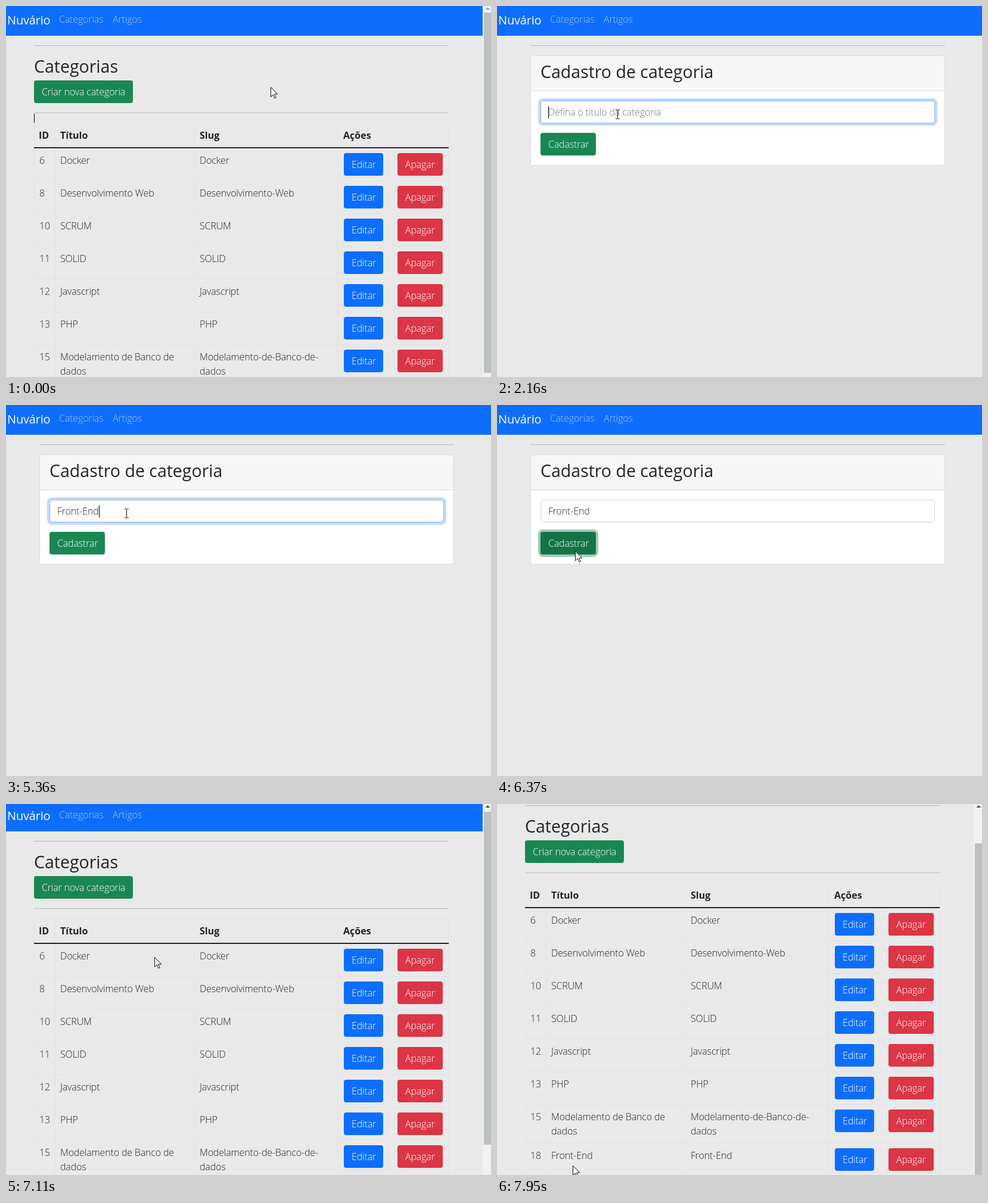
An HTML page for the animation above (8000 ms loop, 814x623 px).

```html
<!DOCTYPE html>
<html lang="pt-BR">
<head>
<meta charset="utf-8">
<title>Categorias</title>
<style>
html, body { margin: 0; width: 100%; height: 100%; overflow: hidden; background: #e9e9e9; }
svg { display: block; width: 814px; height: 623px; }
text { font: 300 16px "Open Sans", "Noto Sans", sans-serif; letter-spacing: -.01em; fill: #212529; white-space: pre; }
.bold { font-weight: 700; letter-spacing: 0; }
.head { font-size: 28.5px; font-weight: 400; letter-spacing: 0; }
.brand { font-size: 20px; font-weight: 400; fill: #fff; }
.nav { fill: #fff; fill-opacity: .6; }
.white { fill: #fff; }
.hint { fill: #6c757d; }
</style>
</head>
<body>
<svg viewBox="0 0 814 623">
  <rect width="814" height="623" fill="#e9e9e9"/>
  <g id="list"></g>
  <g id="bar">
    <rect x="800" width="14" height="623" fill="#f1f1f1"/>
    <path id="up" d="M804.5 6l4-4 4 4z"/>
    <rect id="thumb" x="802" width="12" fill="#bdc0c0"/>
  </g>
  <g id="form"></g>
  <path id="status" d="M0 620.5H198.500Q201.500 620.500 202 623H0z" fill="#dee1e6" stroke="#c6c6c6"/>
  <path id="arrow" d="M.5.5v16l3.700-3.600 2.600 6 2.300-1-2.600-5.900h5.200z" fill="#fff" stroke="#111"/>
  <path id="beam" d="M-3.500-7.500h3M.5-7.500h3M0-7V7M-3.500 7.500h3M.5 7.500h3" fill="none" stroke="#111"/>
</svg>
<script>
const LOOP = 8000, INK = '#212529', GREEN = '#198754', BLUE = '#0d6efd', RED = '#dc3545';
const $ = id => document.getElementById(id);
const rect = (x, y, w, h, fill, more = '') =>
  `<rect x="${x}" y="${y}" width="${w}" height="${h}" fill="${fill}" ${more}/>`;
const text = (x, y, s, cls = '', id = '') => `<text x="${x}" y="${y}" class="${cls}" id="${id}">${s}</text>`;
const button = (x, y, w, label, fill) =>
  rect(x, y, w, 38, fill, 'rx="4"') + text(x + 13, y + 25, label, 'white');

// Green button with a hover layer and a focus ring
const action = (id, x, y, w, label) =>
  rect(x - 2, y - 2, w + 4, 42, 'none', `id="${id}Ring" rx="6" stroke="#3c996e" stroke-opacity=".5" stroke-width="4"`) +
  rect(x, y, w, 38, GREEN, 'rx="4"') +
  rect(x, y, w, 38, '#157347', `id="${id}Hover" rx="4"`) +
  text(x + 13, y + 25, label, 'white');

const header = w => rect(0, 0, w, 50, BLUE) + text(2, 31, 'Nuvário', 'brand') +
  text(89, 28, 'Categorias', 'nav') + text(179, 28, 'Artigos', 'nav');
const rule = (x, y) => rect(x, y, 696, 1, '#b7b8b9');

const rows = [
  [6, 'Docker'], [8, 'Desenvolvimento Web'], [10, 'SCRUM'], [11, 'SOLID'],
  [12, 'Javascript'], [13, 'PHP'], [15, 'Modelamento de Banco de|dados'], [18, 'Front-End']
];

function listPage() {
  const lines = (x, y, s) => s.split('|').map((part, i) => text(x, y + 24 * i, part)).join('');
  const edge = '#dfe2e7';
  let out = header(800) + rule(47, 66) + text(47, 112, 'Categorias', 'head') +
    action('create', 47, 125, 166, 'Criar nova categoria') + rule(47, 179);
  out += rect(47, 181, 1, 21, '#000', 'id="pageCaret"');
  out += rect(47, 196, 696, 1, edge);
  for (const x of [47, 82, 316, 557, 742]) out += rect(x, 196, 1, 520, edge);
  [[55, 'ID'], [91, 'Título'], [325, 'Slug'], [566, 'Ações']]
    .forEach(([x, s]) => out += text(x, 223, s, 'bold'));
  out += rect(47, 237, 696, 2, INK);
  let y = 239;
  for (const [id, name] of rows) {
    const slug = name.replace(/ /g, '-').replace('|', '-|');
    const h = name.includes('|') ? 65 : 55;
    out += text(56, y + 26, id) + lines(91, y + 26, name) + lines(325, y + 26, slug) +
      button(567, y + 8, 66, 'Editar', BLUE) + button(657, y + 8, 76, 'Apagar', RED) +
      rect(47, y + h - 1, 696, 1, edge);
    y += h;
  }
  return out;
}

const formPage = () => header(814) + rule(56, 66) +
  rect(56.5, 83.5, 695, 184, '#fff', 'rx="4"') +
  '<path d="M57 142V87q0-3 3-3H748q3 0 3 3v55z" fill="#f7f7f7"/>' +
  rect(57, 142, 694, 1, '#dadada') +
  rect(56.5, 83.5, 695, 184, 'none', 'rx="4" stroke="#dadada"') +
  text(73, 121, 'Cadastro de categoria', 'head') +
  rect(71, 157, 666, 42, 'none', `id="inputRing" rx="6" stroke="${BLUE}" stroke-opacity=".25" stroke-width="4"`) +
  rect(73.5, 159.5, 661, 37, '#fff', 'id="input" rx="4" stroke="#ced4da"') +
  rect(73.5, 159.5, 661, 37, 'none', 'id="inputEdge" rx="4" stroke="#86b7fe"') +
  text(86, 184, 'Defina o título da categoria', 'hint', 'hint') + text(86, 184, '', '', 'typed') +
  rect(86, 168, 1, 21, '#000', 'id="caret"') +
  action('save', 73, 213, 93, 'Cadastrar');

$('list').innerHTML = listPage();
$('form').innerHTML = formPage();

// Pointer moves: start, end, from, to
const moves = [
  [390, 800, 444, 136, 166, 143],
  [1620, 1960, 166, 143, 202, 182],
  [5890, 6030, 202, 182, 131, 245],
  [6700, 6910, 131, 245, 249, 257],
  [7300, 7670, 249, 257, 150, 640],
  [7949, 7950, 150, 640, 127, 607]
];
const keys = [3220, 3480, 3700, 3900, 4100, 4500, 5030, 5160, 5360];

const ramp = (t, a, b) => Math.min(1, Math.max(0, (t - a) / (b - a)));
const ease = k => k * k * (3 - 2 * k);
const fade = (id, v) => $(id).setAttribute('opacity', v);
const within = (t, a, b) => t >= a && t < b;

function pointer(t) {
  const [a, b, x0, y0, x1, y1] = moves.filter(m => t >= m[0]).pop() || moves[0];
  const k = ease(ramp(t, a, b));
  return [Math.round(x0 + (x1 - x0) * k), Math.round(y0 + (y1 - y0) * k)];
}

function draw(t) {
  const onForm = within(t, 1420, 6500), reloaded = t >= 6500;
  const scroll = t < 7110 ? 0 : Math.round(4 + 60 * ease(ramp(t, 7110, 7370)));
  $('form').style.display = onForm ? '' : 'none';
  $('list').style.display = $('bar').style.display = onForm ? 'none' : '';
  $('list').setAttribute('transform', `translate(0 ${-scroll})`);
  $('thumb').setAttribute('y', (reloaded ? 9.5 : 11) + scroll * .885);
  $('thumb').setAttribute('height', reloaded ? 559 : 605);
  $('up').setAttribute('fill', scroll ? '#505050' : '#a3a3a3');

  fade('createHover', reloaded ? 0 : ramp(t, 680, 800));
  fade('createRing', reloaded ? 0 : ramp(t, 1070, 1220));
  fade('pageCaret', +(t < 530 || within(t, 1070, 1200)));
  fade('status', +within(t, 1200, 1700));

  const focus = ramp(t, 1980, 2130) * (1 - ramp(t, 6290, 6370));
  fade('inputRing', focus);
  fade('inputEdge', focus);
  fade('saveHover', ramp(t, 5980, 6080));
  fade('saveRing', ramp(t, 6290, 6370));

  const count = keys.filter(k => t >= k).length;
  $('typed').textContent = 'Front-End'.slice(0, count);
  fade('hint', count ? 0 : 1);
  const since = t - (count ? keys[count - 1] : 2030);
  fade('caret', +(since >= 0 && since % 1060 < 530 && t < 6290));
  $('caret').setAttribute('x', 86 + Math.round(count && onForm ? $('typed').getComputedTextLength() : 0));

  const [x, y] = pointer(t), inField = onForm && within(y, 159, 197);
  fade('arrow', inField ? 0 : 1);
  fade('beam', inField ? 1 : 0);
  $('arrow').setAttribute('transform', `translate(${x} ${y})`);
  $('beam').setAttribute('transform', `translate(${x + .5} ${y})`);
}

const start = performance.now();
function tick() {
  draw((performance.now() - start) % LOOP);
  requestAnimationFrame(tick);
}
tick();
</script>
</body>
</html>
```
